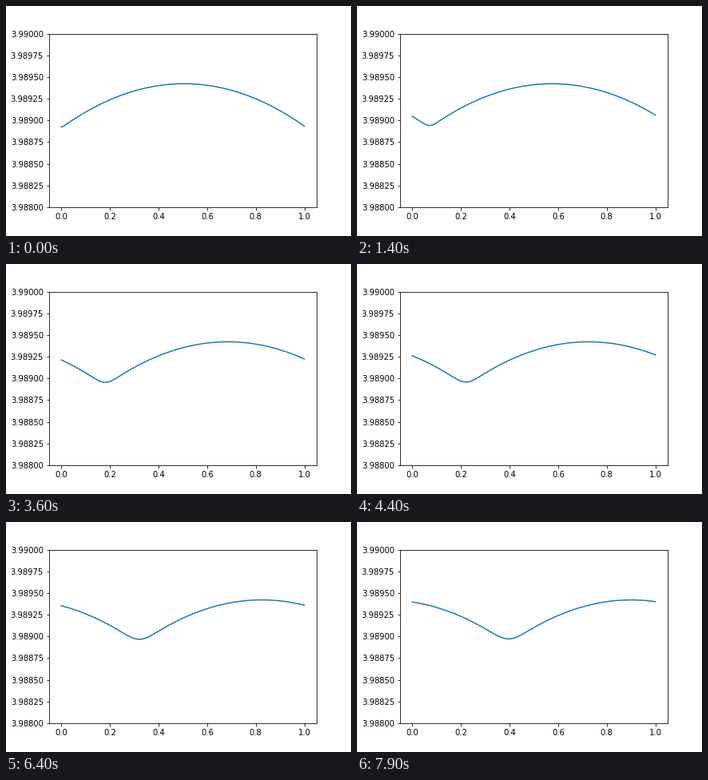
These frames come from a looping animation (432 by 288 pixels, 8000 ms). A matplotlib script:

```python
import matplotlib.pyplot as plt
import numpy as np
from matplotlib.animation import FuncAnimation

FRAMES = 80
CELLS = 120
COURANT = 0.6

x = np.linspace(0, 1, CELLS + 1)


def bell(x, mean=0.5, var=1000.0):
    return 10 * np.exp(-(x - mean) ** 2 / (2 * var)) / np.sqrt(2 * np.pi)


def upwind(u):
    """One periodic first-order advection step to the right."""
    return u - COURANT * (u - np.roll(u, 1))


history = [upwind(bell(x))]
for _ in range(FRAMES - 1):
    history.append(upwind(history[-1]))

fig = plt.figure(figsize=(6, 4), dpi=72, facecolor="white")
fig.subplots_adjust(left=0.125, right=0.9, bottom=0.125, top=0.88)
ax = fig.add_subplot()
line, = ax.plot(x, history[0], color="#1f77b4", lw=1.5)
ax.set_xlim(-0.05, 1.05)
ax.set_ylim(3.988, 3.990)
ax.set_xticks(np.linspace(0, 1, 6))
ax.set_yticks(np.linspace(3.988, 3.990, 9))
ax.yaxis.set_major_formatter("{x:.5f}")


def update(i):
    line.set_ydata(history[i])
    return line,


anim = FuncAnimation(fig, update, frames=FRAMES, interval=100,
                     repeat=True, repeat_delay=0)
plt.show()
```
